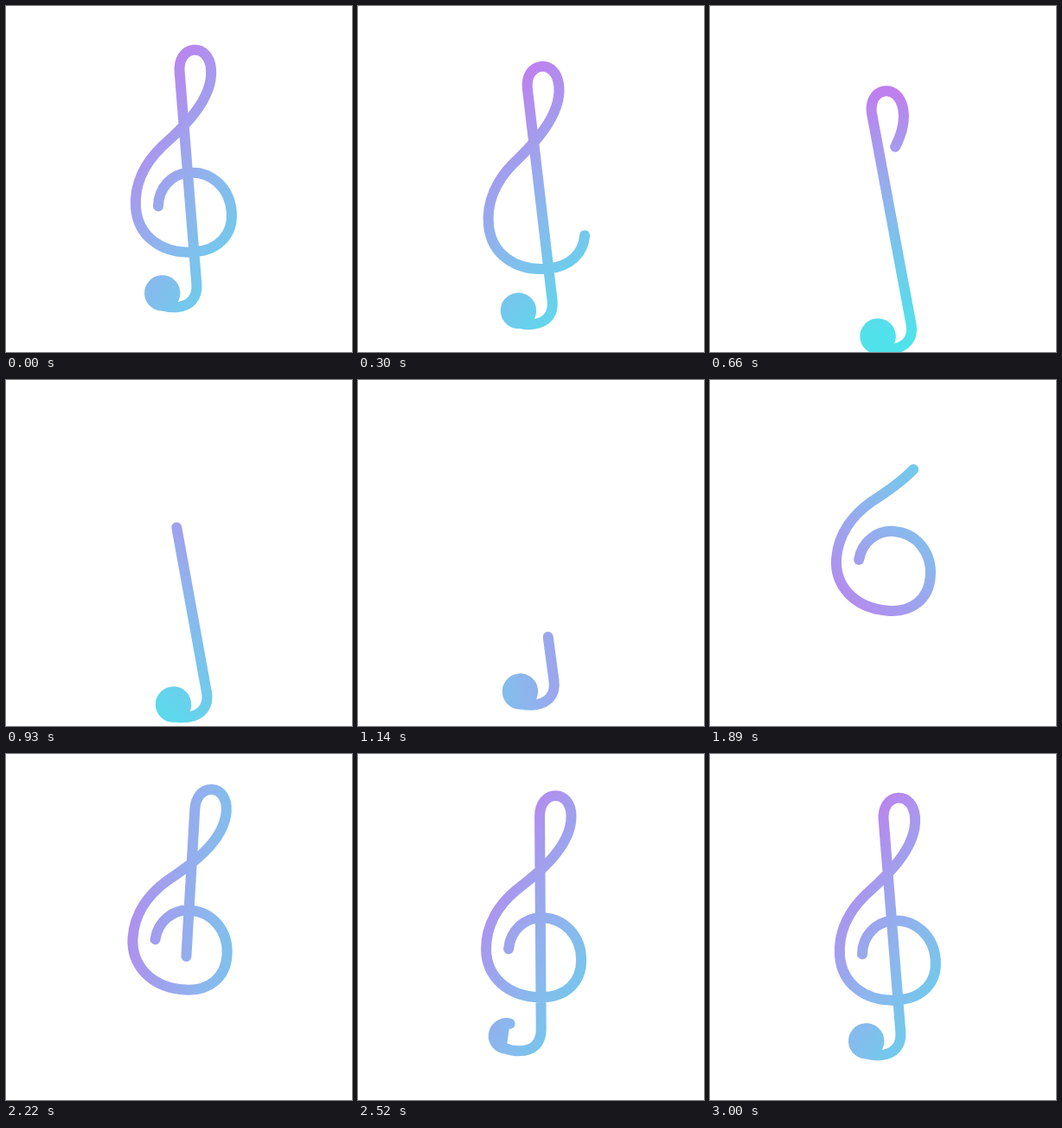
Recreate the animation shown at these times as an HTML page. Size 400 px wide and 400 px high, loop 3030 ms.

```html
<!DOCTYPE html>
<html lang="en">
<head>
<meta charset="utf-8">
<title>Treble clef</title>
<style>
  html, body { margin: 0; width: 100%; height: 100%; overflow: hidden; background: #fff; }
  svg { display: block; width: 100%; height: 100%; }
  path { stroke: url(#ink); stroke-width: 12; stroke-linecap: round; fill: none; }
  .ball { fill: url(#ink); stroke-linejoin: round; }
</style>
</head>
<body>
<svg viewBox="0 0 400 400">
  <defs>
    <linearGradient id="ink" gradientUnits="userSpaceOnUse">
      <stop offset="0" stop-color="#c776ef"/>
      <stop offset=".5" stop-color="#8cb6ed"/>
      <stop offset="1" stop-color="#50e2eb"/>
    </linearGradient>
  </defs>
  <g id="clef">
    <g id="piece">
      <path class="line" d="M174 225 C176 203 193 189 212 189 C238 189 258 210 258 238
        C258 264 240 281 212 281 C172 281 148 256 148 225 C148 195 165 172 183 157
        C204 141 247 109 247 72 C247 57 239 48 229 48 C218 48 210.5 58 210.5 72
        L211.3 318 C211.3 334 202 343 186 343 C180 343 175 342 170.5 340"/>
      <path class="ball"/>
    </g>
  </g>
</svg>
<script>
const LOOP = 3030, STEP = 30, DRAWN_BY = 2720;
const BALL = { x: 171, y: 325.5, r: 14.7 };
const HUE = { span: 300, mid: 0.4 };

// Keys are [ms, value]; the motion eases in and out at every extreme.
const lift = track([[0, 4.5], [690, 53.5], [1890, -15], [2790, 4.5], [3000, 4.5]]);
const tilt = track([[0, 4.4], [780, 10.8], [1980, -4.8], [3000, 4.4]]);
const erased = track([[0, 0], [660, .465], [1140, .789], [1350, 1], [3000, 1]]);
const drawn = track([[0, 0], [1140, 0], [DRAWN_BY, 1], [3000, 1]]);
const hueAngle = track([[0, 35], [DRAWN_BY, 395], [3000, 395]]);

const clef = document.getElementById('clef');
const ink = document.getElementById('ink');
const leaving = document.getElementById('piece');
const arriving = clef.appendChild(leaving.cloneNode(true));
arriving.removeAttribute('id');

const lineLen = leaving.querySelector('.line').getTotalLength();
const total = lineLen + 2 * Math.PI * BALL.r;

// Monotone cubic through the keys, flat wherever the direction turns.
function track(keys) {
  const n = keys.length - 1;
  const slope = i => (keys[i + 1][1] - keys[i][1]) / (keys[i + 1][0] - keys[i][0]);
  const tangent = i => {
    const a = slope((i + n - 1) % n), b = slope(i % n);
    return a * b > 0 && i > 0 && i < n ? 2 * a * b / (a + b) : 0;
  };
  return t => {
    let i = 0;
    while (i < n - 1 && t >= keys[i + 1][0]) i++;
    const [t0, v0] = keys[i], [t1, v1] = keys[i + 1];
    const w = t1 - t0, u = (t - t0) / w, q = 1 - u;
    return v0 * q * q * (1 + 2 * u) + v1 * u * u * (3 - 2 * u)
      + w * u * q * (tangent(i) * q - tangent(i + 1) * u);
  };
}

// Part of the ball's outline, clockwise from its lowest point.
function arc(from, to) {
  const at = len => {
    const a = Math.PI / 2 + len / BALL.r;
    return `${BALL.x + BALL.r * Math.cos(a)} ${BALL.y + BALL.r * Math.sin(a)}`;
  };
  const turn = `A${BALL.r} ${BALL.r} 0 0 1 `;
  return `M${at(from)}${turn}${at((from + to) / 2)}${turn}${at(to)}`;
}

// Show only the stretch of a piece between two fractions of its length.
function trim(piece, from, to) {
  const line = piece.querySelector('.line'), ball = piece.querySelector('.ball');
  const start = from * total, end = to * total;
  const dash = Math.min(end, lineLen) - start;
  line.style.display = dash > 0.1 ? '' : 'none';
  line.style.strokeDasharray = `${Math.max(dash, 0)} ${2 * total}`;
  line.style.strokeDashoffset = -start;
  const b0 = Math.max(0, start - lineLen), b1 = end - lineLen;
  ball.setAttribute('d', b1 - b0 > 0.1 ? arc(b0, b1) : '');
}

function shade(t, angle, y) {
  const a = hueAngle(t) * Math.PI / 180;
  const put = (k, offset) => {
    ink.setAttribute('x' + k, 200 + Math.cos(a) * HUE.span * offset);
    ink.setAttribute('y' + k, 200 + Math.sin(a) * HUE.span * offset);
  };
  put(1, -HUE.mid);
  put(2, 1 - HUE.mid);
  // Undo the clef's own motion so the colours stay fixed to the stage.
  ink.setAttribute('gradientTransform', `rotate(${angle} 200 200) translate(0 ${-y})`);
}

function render(t) {
  const angle = tilt(t), y = lift(t);
  clef.setAttribute('transform', `translate(0 ${y}) rotate(${-angle} 200 200)`);
  shade(t, angle, y);
  trim(leaving, erased(t), 1);
  trim(arriving, 0, drawn(t));
}

const start = performance.now();
function tick() {
  const t = (performance.now() - start) % LOOP;
  render(Math.floor(t / STEP) * STEP);
  requestAnimationFrame(tick);
}
tick();
</script>
</body>
</html>
```
